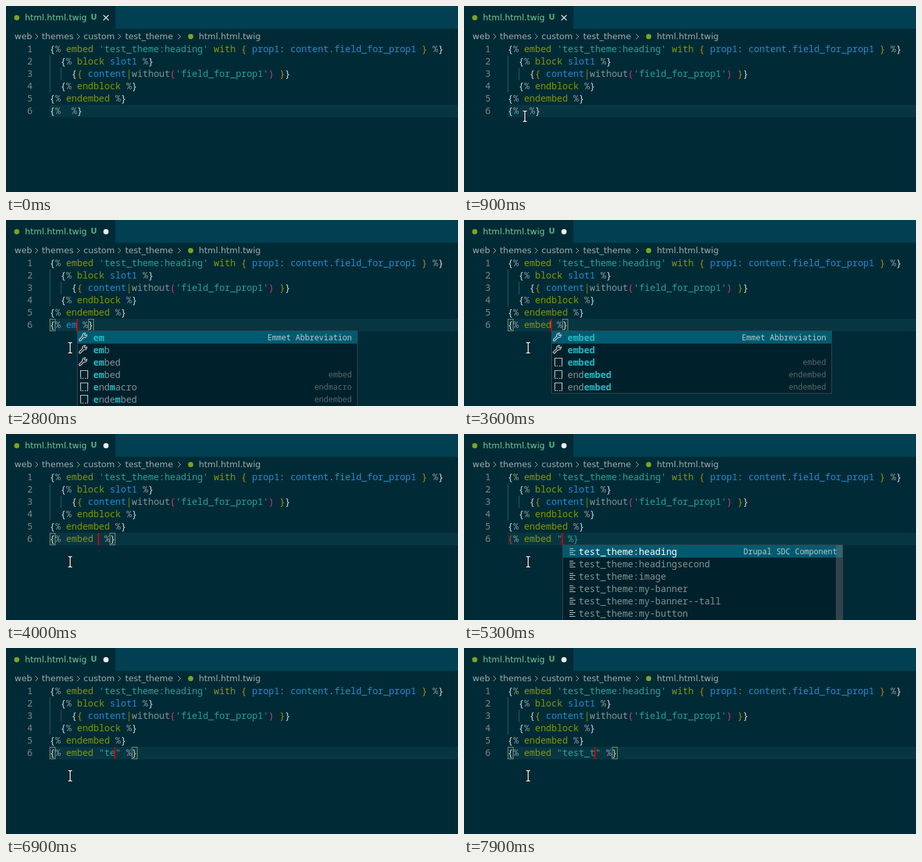
An HTML page that plays this animation: 694x286 px, repeating every 8 s.

```html
<!DOCTYPE html>
<html lang="en">
<head>
<meta charset="utf-8">
<style>
html, body { margin: 0; width: 694px; height: 286px; overflow: hidden; background: #002b36; }
body { position: relative; font: 13px/22px 'DejaVu Sans', sans-serif; color: #a3acae; }
body *, svg { position: absolute; white-space: pre; box-sizing: border-box; }
#strip { left: 168px; right: 0; height: 35px; background: #004052; }
.ui { top: 36px; }
.tab { top: 0; line-height: 35px; color: #73c991; }
.code { font: 14px/19px 'Noto Sans Mono', 'DejaVu Sans Mono', monospace; left: 67px; color: #839496; }
.code span, .row span { position: static; }
.num { left: 0; width: 41px; text-align: right; color: #858585; }
#current { left: 67px; right: 0; top: 152px; height: 19px; background: #073642; }
.guide { width: 1px; background: #365a63; }
.pair { top: 152px; width: 9px; height: 19px; border: 1px solid #888; background: rgba(0, 100, 0, .1); }
#caret { top: 152px; width: 2px; height: 19px; background: #d30102; }
#popup { top: 170px; width: 431px; background: #00212b; border: 1px solid #36474c; overflow: hidden; }
.row { left: 0; width: 100%; height: 19px; font: 14px/19px 'Noto Sans Mono', 'DejaVu Sans Mono', monospace; color: #839496; }
.row.on { background: #005a6f; color: #fff; }
.row b { position: static; color: #1ebcc5; }
.row i { right: 8px; font-style: normal; font-size: 12px; color: #56676c; }
.row.on i { color: #b5cad0; }
.row .label { position: absolute; left: 24px; }
.bar { right: 0; top: 0; width: 10px; height: 200px; background: rgba(121, 121, 121, .4); }
svg { left: 0; top: 0; fill: none; overflow: visible; }
</style>
</head>
<body>
<div id="strip"></div>
<div class="tab" style="left:29px">html.html.twig</div>
<div class="tab" style="left:130px;opacity:.8;font-weight:bold;font-size:12px">U</div>
<div class="ui" style="left:13px">web</div>
<div class="ui" style="left:55px">themes</div>
<div class="ui" style="left:119px">custom</div>
<div class="ui" style="left:183px">test_theme</div>
<div class="ui" style="left:296px">html.html.twig</div>
<div id="current"></div>
<div class="guide" style="left:67px;top:76px;height:57px"></div>
<div class="guide" style="left:84px;top:95px;height:19px"></div>
<div id="lines"></div>
<div id="edit"></div>
<div id="popup"></div>
<div id="caret"></div>
<svg width="694" height="286">
  <g fill="#7ca321"><circle cx="16.5" cy="18" r="4"/><circle cx="283.5" cy="47" r="4"/></g>
  <path stroke="#a3acae" d="M45 43l4 4-4 4M109 43l4 4-4 4M172 43l4 4-4 4M264 43l4 4-4 4"/>
  <path id="close" stroke="#eee" stroke-width="1.3" d="M149.500 14l8 8m0-8l-8 8"/>
  <circle id="dirty" cx="153.500" cy="18" r="4" fill="#eee"/>
  <g id="mouse"><path id="beam" stroke="#000" stroke-width="3.400" d="M-3-8h2l1 1 1-1h2M0-7V7M-3 8h2l1-1 1 1h2"/>
  <path stroke="#fff" stroke-width="1.500" d="M-3-8h2l1 1 1-1h2M0-7V7M-3 8h2l1-1 1 1h2"/></g>
</svg>
<script>
const $ = id => document.getElementById(id);
const LOOP = 8000, X0 = 67, CELL = 8.4;
const colors = { w: '#d5dcdc', g: '#839496', k: '#859900', s: '#2aa198', v: '#268bd2', y: '#b58900', m: '#d33682', r: '#dc322f' };

// "^k" switches to the colour named k
const paint = text => text.split('^').slice(1)
  .map(p => `<span style="color:${colors[p[0]]}">${p.slice(1)}</span>`).join('');
const lineTop = n => 37 + 19 * n;
const line = (n, text) => `<div class="code" style="top:${lineTop(n)}px">${paint(text)}</div>`;

$('lines').innerHTML = [
  "^w{^g% ^kembed ^s'test_theme:heading' ^kwith ^y{ ^vprop1^g: ^vcontent^g.^vfield_for_prop1 ^y} ^g%^w}",
  "  ^w{^g% ^kblock ^vslot1 ^g%^w}",
  "    ^w{^y{ ^vcontent^k|^gwithout^m(^s'field_for_prop1'^m) ^y}^w}",
  "  ^w{^g% ^kendblock ^g%^w}",
  "^w{^g% ^kendembed ^g%^w}"
].map((t, i) => line(i + 1, '^g' + t)).join('') +
  [1, 2, 3, 4, 5, 6].map(n => `<div class="code num" style="left:0;top:${lineTop(n)}px">${n}</div>`).join('');

const icons = {
  wrench: 'M4.500 14.500l5-5a3.500 3.500 0 0 0 4.500-4.500l-2.200 2-1.800-1.800 2-2.200a3.500 3.500 0 0 0-4.500 4.500l-5 5a1.400 1.400 0 0 0 2 2z',
  square: 'M4.500 14.500V3.500h11v11M4 15.500h2m1 0h2m2 0h2m1 0h2',
  list: 'M10 5.500h6M10 8.500h9M10 11.500h6M10 14.500h9'
};
const row = ([icon, text, detail], i) => `<div class="row${i ? '' : ' on'}" style="top:${19 * i}px">
<svg width="20" height="19"><path stroke="#ccc" stroke-width="1.200" d="${icons[icon]}"/></svg>
<span class="label">${text.replace(/\*(.+?)\*/g, '<b>$1</b>')}</span><i>${detail || ''}</i></div>`.replace(/\n/g, '');

const emmet = 'Emmet Abbreviation';
const lists = {
  em: [['wrench', '*em*', emmet], ['wrench', '*em*b'], ['wrench', '*em*bed'], ['square', '*em*bed', 'embed'],
    ['square', '*e*nd*m*acro', 'endmacro'], ['square', '*e*nde*m*bed', 'endembed']],
  names: ['heading', 'headingsecond', 'image', 'my-banner', 'my-banner--tall', 'my-button']
    .map((n, i) => ['list', 'test_theme:' + n, i ? '' : 'Drupal SDC Component'])
};
const embedList = typed => {
  const word = `*${typed}*${'embed'.slice(typed.length)}`;
  return [['wrench', `*${typed}*`, emmet], ['wrench', word], ['square', word, 'embed'],
    ['square', 'end' + word, 'endembed'], ['square', 'end' + word, 'endembed']];
};

// time, text between the tags, caret steps back from its end
const keys = [[1200, ''], [2400, 'e'], [2600, 'em'], [3000, 'emb'], [3200, 'embe'], [3400, 'embed'],
  [3800, 'embed '], [4900, 'embed "'], [5400, 'embed ""'], [6300, 'embed ""', 1]];
[6700, 6900, 7100, 7300, 7600, 7800].forEach((t, i) => keys.push([t, `embed "${'test_t'.slice(0, i + 1)}"`, 1]));

function suggestions(t, text) {
  if (t >= 2700 && t < 3000) return lists.em;
  if (t >= 3000 && t < 3800) return embedList(text);
  if (t >= 5100 && t < 6300) return lists.names;
}

function showEdit(text, focused) {
  const open = text === 'embed "';
  const word = text.startsWith('embed') ? '^kembed^s' + text.slice(5) : '^v' + text;
  const pair = col => `<div class="pair" style="left:${X0 + col * CELL}px"></div>`;
  $('edit').innerHTML = (focused && !open ? pair(0) + pair(text.length + 5) : '') +
    line(6, `^${open ? 'r' : 'w'}{^g% ${word}${open ? '^s %}' : '^g %^w}'}`);
}

function showPopup(rows, x) {
  const box = $('popup');
  box.style.display = rows ? '' : 'none';
  if (!rows) return;
  box.style.left = Math.floor(x) + 'px';
  box.style.height = rows === lists.em || rows === lists.names ? '120px' : rows.length * 19 + 2 + 'px';
  box.innerHTML = rows.map(row).join('') + (rows === lists.names ? '<div class="bar"></div>' : '');
}

let shown;
function draw() {
  const t = performance.now() % LOOP;
  const focused = t >= keys[0][0];
  const [at, text, back = 0] = keys.filter(k => k[0] <= t).pop() || keys[0];
  const x = X0 + (3 + text.length - back) * CELL;
  const rows = suggestions(t, text);
  const state = [focused, text, back, !!rows].join();
  if (state !== shown) {
    shown = state;
    showEdit(text, focused);
    showPopup(rows, x);
  }
  $('caret').style.left = Math.floor(x) - 1 + 'px';
  $('caret').style.display = focused && (t - at) % 1000 < 500 ? '' : 'none';
  const dirty = t >= 2400;
  $('dirty').style.display = dirty ? '' : 'none';
  $('close').style.display = dirty ? 'none' : '';
  const p = Math.min(1, Math.max(0, (t - 1200) / 400)), ease = p * p * (3 - 2 * p);
  $('mouse').style.display = t < 900 ? 'none' : '';
  $('mouse').setAttribute('transform', `translate(${93.5 + 5 * ease} ${169.5 + 27 * ease})`);
  requestAnimationFrame(draw);
}
draw();
</script>
</body>
</html>
```
